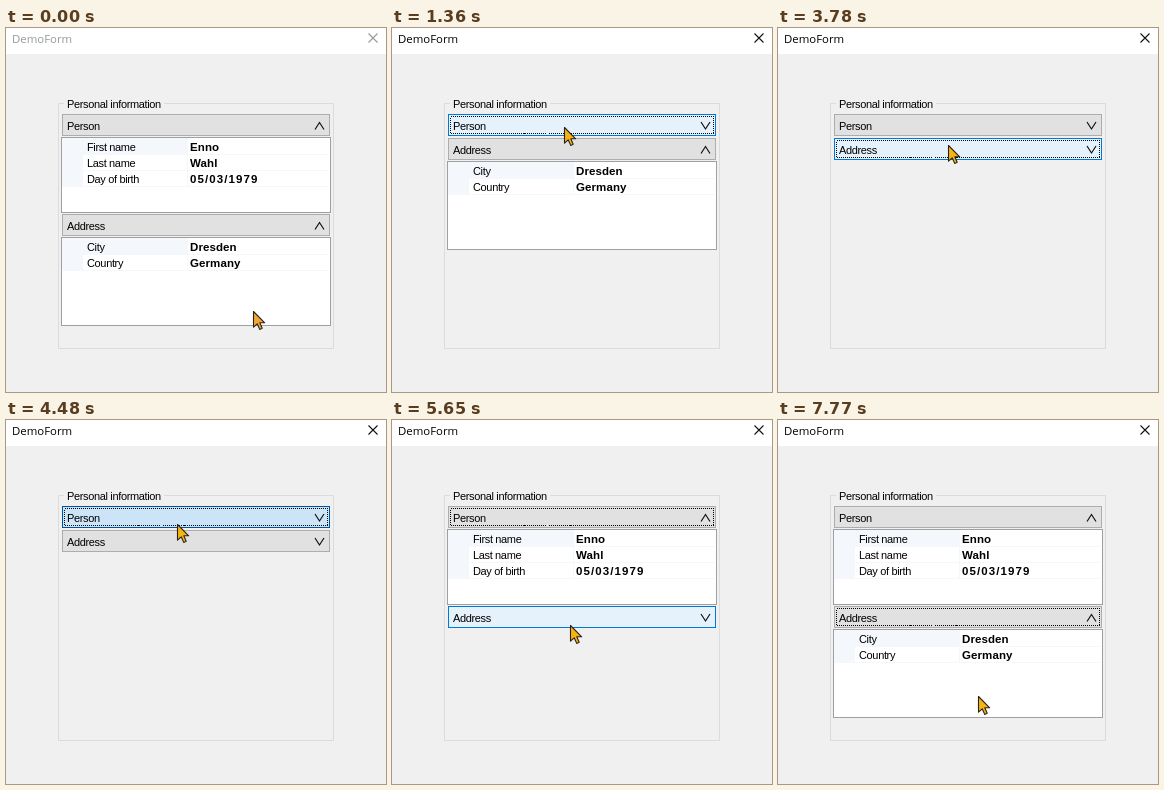
These frames come from a looping animation (380 px wide and 364 px high, 7.84 s). An HTML page:

```html
<!DOCTYPE html>
<html lang="en">
<head>
<meta charset="utf-8">
<title>DemoForm</title>
<style>
  html, body { margin: 0; width: 100%; height: 100%; overflow: hidden; background: #f0f0f0; }
  svg { display: block; }
  rect, .line { shape-rendering: crispEdges; }
  text { font: 11px "Liberation Sans", Arial, sans-serif; letter-spacing: -.35px; fill: #000; }
  .value { font-weight: bold; font-size: 11.5px; letter-spacing: .1px; }
  .date { letter-spacing: 1.1px; }
  .title { font: 11.4px "Open Sans", sans-serif; letter-spacing: 0; }
</style>
</head>
<body>
<svg id="stage" width="380" height="364" viewBox="0 0 380 364"></svg>
<script>
const LOOP = 7840;
const stage = document.getElementById('stage');

function add(parent, tag, attrs, text) {
  const el = document.createElementNS('http://www.w3.org/2000/svg', tag);
  set(el, attrs);
  if (text) el.textContent = text;
  parent.appendChild(el);
  return el;
}
function set(el, attrs) {
  for (const key in attrs) el.setAttribute(key, attrs[key]);
}
const box = (parent, x, y, width, height, fill, more) =>
  add(parent, 'rect', { x, y, width, height, fill, ...more });
const label = (parent, x, y, text, cls = '') =>
  add(parent, 'text', { x, y, class: cls }, text);

// Window and group frame
box(stage, 0, 0, 380, 364, '#f0f0f0');
box(stage, 0, 0, 380, 26, '#fff');
const title = label(stage, 6, 15, 'DemoForm', 'title');
const cross = add(stage, 'path', { d: 'M362.5 5.5l9 9m0-9l-9 9', fill: 'none' });
add(stage, 'path', {
  d: 'M58 75.5H52.5V320.5H327.5V75.5H158', fill: 'none', stroke: '#dcdcdc', class: 'line'
});
label(stage, 61, 80, 'Personal information');

// A collapsible section; its origin is the top of the header
function makeSection(name, height, rows) {
  const root = add(stage, 'g', {});
  const grid = add(root, 'g', {});
  box(grid, 55.5, 23.5, 269, height - 1, '#fff', { stroke: '#a0a0a0' });
  box(grid, 56, 24, 21, rows.length * 16 + 1, '#f4f7fc');
  box(grid, 77, 24, 104, 17, '#f4f7fc');
  box(grid, 181, 24, 1, rows.length * 16 + 1, '#f4f7fc');
  rows.forEach(([key, value, cls = ''], i) => {
    const y = 37 + i * 16;
    box(grid, 77, y + 3, 246, 1, '#f4f7fc');
    label(grid, 81, y, key);
    label(grid, 184, y, value, 'value ' + cls);
  });
  const button = box(root, 56.5, .5, 267, 21);
  const focus = box(root, 58.5, 2.5, 263, 17, 'none', { stroke: '#000', 'stroke-dasharray': '1 1' });
  label(root, 61, 16, name);
  const chevron = add(root, 'path', { fill: 'none', stroke: '#111', 'stroke-width': 1.2 });
  return { root, grid, button, focus, chevron, height };
}

const sections = [
  makeSection('Person', 76, [
    ['First name', 'Enno'], ['Last name', 'Wahl'], ['Day of birth', '05/03/1979', 'date']
  ]),
  makeSection('Address', 89, [['City', 'Dresden'], ['Country', 'Germany']])
];

const cursor = add(stage, 'path', {
  d: 'M.5 .5V16.2L4.2 12.8L6.7 18.4L9.2 17.3L6.8 11.8H11.7Z',
  stroke: '#2b2018', 'stroke-width': 1.1, 'stroke-linejoin': 'round'
});

// Clicks: press time, release time, section index
const clicks = [[1200, 1360, 0], [2750, 2920, 1], [4480, 4640, 0], [6210, 6280, 1]];

// Cursor moves: first step, last step, number of steps, goal
const moves = [
  [70, 790, 10, 171, 103],
  [890, 960, 2, 172, 99],
  [1820, 2220, 6, 170, 125],
  [3610, 4080, 7, 171, 104],
  [5100, 5650, 8, 178, 205],
  [5980, 6050, 2, 179, 202],
  [7600, 7770, 3, 200, 276]
];

const ease = p => .8 * p * p * (3 - 2 * p) + .2 * p;

function cursorAt(t) {
  let x = 247, y = 283;
  for (const [from, to, steps, gx, gy] of moves) {
    if (t < from) break;
    const gap = (to - from) / (steps - 1);
    const k = ease(Math.min(steps, Math.floor((t - from) / gap + 1e-6) + 1) / steps);
    x += (gx - x) * k;
    y += (gy - y) * k;
  }
  return [Math.round(x), Math.round(y)];
}

const looks = {
  normal: ['#e1e1e1', '#adadad'],
  hover: ['#e5f1fb', '#0078d7'],
  pressed: ['#cce4f7', '#005499']
};

function draw(t) {
  const [cx, cy] = cursorAt(t);
  const open = [true, true];
  let focused = -1, pressed = -1;
  for (const [down, up, i] of clicks) {
    if (t >= down) focused = i;
    if (t >= down && t < up) pressed = i;
    if (t >= up) open[i] = !open[i];
  }

  const active = focused >= 0;
  title.style.fill = active ? '#000' : '#949c94';
  set(cross, { stroke: active ? '#111' : '#999', 'stroke-width': 1.1 });

  let top = 86;
  sections.forEach((s, i) => {
    const over = cx >= 56 && cx < 324 && cy >= top && cy < top + 22;
    const [fill, stroke] = looks[pressed === i ? 'pressed' : over ? 'hover' : 'normal'];
    set(s.root, { transform: `translate(0 ${top})` });
    set(s.button, { fill, stroke });
    set(s.grid, { visibility: open[i] ? 'visible' : 'hidden' });
    set(s.focus, { visibility: focused === i ? 'visible' : 'hidden' });
    set(s.chevron, { d: open[i] ? 'M309 15.5L313.5 8.5L318 15.5' : 'M309 8L313.5 15L318 8' });
    top += 24 + (open[i] ? s.height : 0);
  });

  set(cursor, { transform: `translate(${cx} ${cy})`, fill: t < 70 ? '#f2a636' : '#f3b414' });
}

const start = performance.now();
function tick() {
  draw((performance.now() - start) % LOOP);
  requestAnimationFrame(tick);
}
draw(0);
requestAnimationFrame(tick);
</script>
</body>
</html>
```
